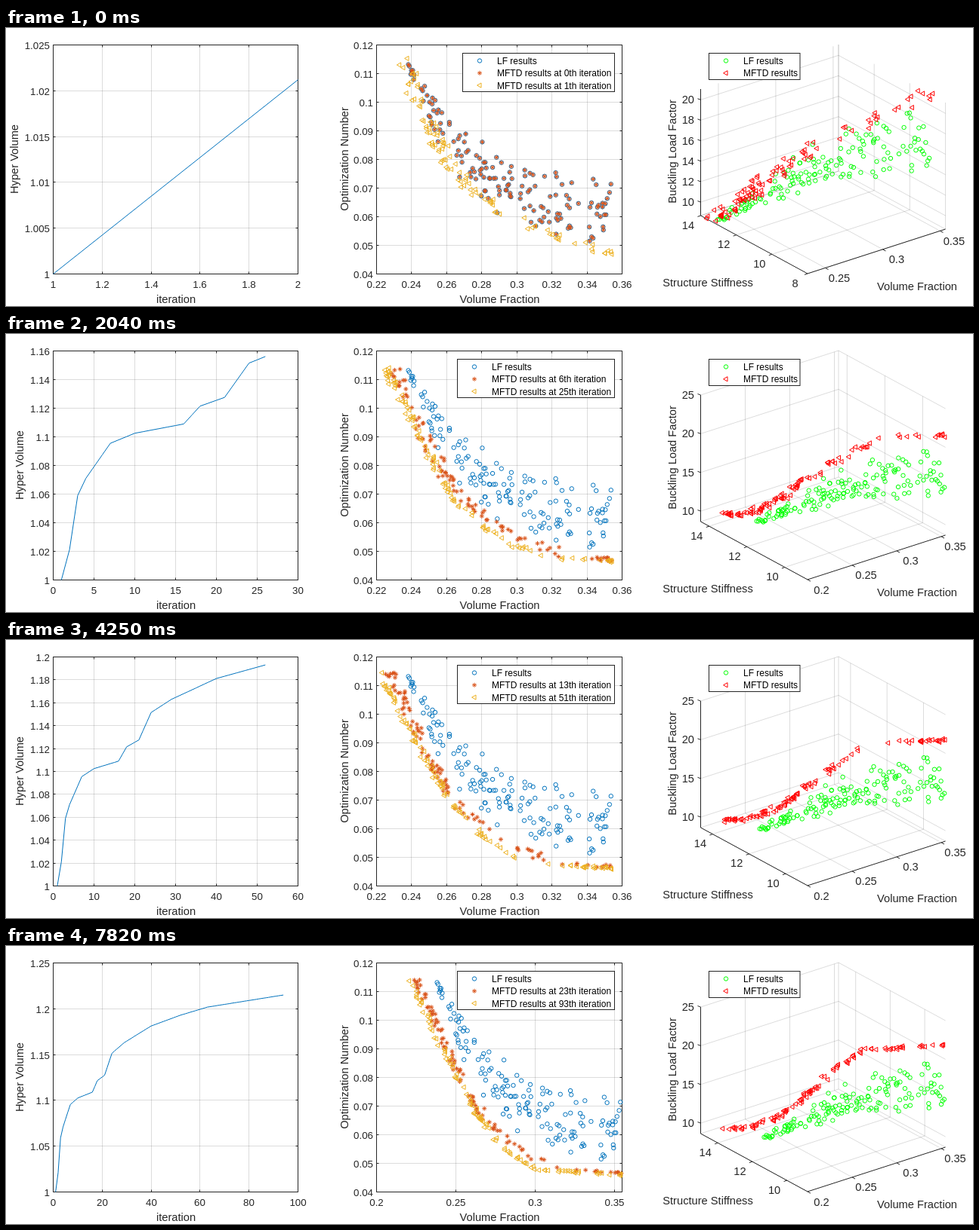
An HTML page for the animation above (7990 ms loop, 1280x369 px).

```html
<!DOCTYPE html>
<html lang="en">
<head>
<meta charset="utf-8">
<title>Optimization progress</title>
<style>
html, body { margin: 0; width: 100%; height: 100%; overflow: hidden; background: #fff; }
svg { display: block; width: 1280px; height: 369px; font-family: "Liberation Sans", Arial, sans-serif; fill: none; }
text { fill: #262626; font-size: 13.3px; }
.name, .space text { font-size: 14.67px; }
.key text { font-size: 12px; fill: #000; }
.key rect { fill: #fff; stroke: #262626; }
.grid { stroke: #262626; stroke-opacity: .16; }
.axis { stroke: #262626; }
</style>
</head>
<body>
<svg id="stage" viewBox="0 0 1280 369"></svg>
<script>
const STEP = 170, STEPS = 47;
const BLUE = '#0072bd', RUST = '#d95319', GOLD = '#edb120', GREEN = '#00ff00', RED = '#ff0000';
const stage = document.getElementById('stage');

// Turning points of the hyper volume: [iteration, value]
const VOLUME = [[1, 1], [2, 1.0212], [3, 1.059], [4, 1.071], [7, 1.0955], [10, 1.1025], [16, 1.109], [18, 1.1215],
  [21, 1.1275], [24, 1.1515], [29, 1.163], [40, 1.1812], [52, 1.193], [63, 1.2018], [94, 1.215]];

const rnd = (a, b) => { const s = Math.sin(a * 12.9898 + b * 78.233 + 3.7) * 43758.5453; return s - Math.floor(s); };
const mix = (a, b, f) => a + (b - a) * f;
const fmt = v => String(+v.toFixed(4));
const r1 = v => Math.round(v * 10) / 10;

function volumeAt(n) {
  const i = Math.max(1, VOLUME.findIndex(p => p[0] >= n));
  const [a, va] = VOLUME[i - 1], [b, vb] = VOLUME[i];
  return mix(va, vb, (n - a) / (b - a));
}

// Progress of the search from 0 (start) to 1 (iteration 93)
const progress = it => Math.log(1 + it) / Math.log(94);

// Stage position in the middle chart to a design with its three properties
function design(x, y, noise) {
  const vol = .22 + (x - 490.5) / 2321, opt = .12 - (y - 22.5) / 3800;
  const stiff = 8.88 + 34.9 * (.3535 - vol) + 1.45 * Math.exp((.219 - vol) / .0155) + noise;
  return { vol, opt, stiff, load: 1 / opt };
}

// Low fidelity designs fill a band above an exponential decay
const base = Array.from({ length: 150 }, (_, i) => {
  const x = 532 + 272 * rnd(i, 7), d = x - 530;
  const floor = 298 - 254 * Math.exp(-d / 75), span = 90 * (1 - Math.exp(-d / 45));
  return design(x, floor - span * rnd(i, 8), (rnd(i, 9) - .5) * .5);
});

// Each member keeps its place for a while, then is renewed on the front of that time
function front(it) {
  return Array.from({ length: 100 }, (_, j) => {
    const off = rnd(j, 1), era = Math.floor(Math.log(1 + it) * 5 + off);
    const born = Math.max(0, Math.exp((era - off) / 5) - 1);
    const seed = j + era * 131, p = progress(born);
    const slope = h => mix(531, 489, p) + mix(90, 140, p) * h + mix(180, 45, p) * h ** mix(4, 8, p);
    const amp = 4 + 7 * Math.exp(-born / 15);
    const dx = (rnd(seed, 3) * 2 - 1) * amp, dy = (rnd(seed, 4) - .5) * amp;
    const noise = (rnd(seed, 6) - .5) * amp * .05;
    const tail = .06 + (803 - slope(1)) / 900, t = rnd(seed, 2);
    if (t > tail) {
      const h = (t - tail) / (1 - tail);
      return design(slope(h) + dx, 44 + 252 * h + dy, noise);
    }
    const f = 1 - (1 - t / tail) ** 1.7;
    return design(mix(slope(1), 802, f), 297 + 7 * p * f + dy * .6, noise);
  });
}

const path = (d, attr) => `<path d="${d}" ${attr}/>`;
const text = (x, y, s, anchor = 'middle', more = '') => `<text x="${r1(x)}" y="${r1(y)}" text-anchor="${anchor}" ${more}>${s}</text>`;
const name = (x, y, s) => text(x, y, s, 'middle', 'class="name"');
const upright = (x, y, s) => text(0, 0, s, 'middle', `class="name" transform="translate(${x} ${y}) rotate(-90)"`);
const line = (a, b) => `M${r1(a[0])} ${r1(a[1])}L${r1(b[0])} ${r1(b[1])}`;

const SHAPES = {
  ring: 'm-2.7 0a2.7 2.7 0 1 0 5.4 0a2.7 2.7 0 1 0 -5.4 0',
  star: 'm-3 0h6m-3 -3v6m-2.1 -5.1l4.2 4.2m0 -4.2l-4.2 4.2',
  tri: 'm-3.4 0l5.4 -3.1v6.2z'
};
const marks = (pts, shape, color) =>
  path(pts.map(p => `M${r1(p[0])} ${r1(p[1])}${SHAPES[shape]}`).join(''), `stroke="${color}"`);

function niceScale(lo, hi, most) {
  for (let e = -3; ; e++) for (const m of [1, 2, 5]) {
    const step = m * 10 ** e;
    const a = Math.floor(lo / step + 1e-6) * step, b = Math.ceil(hi / step - 1e-6) * step;
    if ((b - a) / step < most + .5) return { lo: a, hi: b, step };
  }
}

function ticks({ lo, hi, step }) {
  const out = [];
  for (let i = Math.ceil(lo / step - 1e-6); i * step <= hi + 1e-6; i++) out.push(i * step);
  return out;
}

function flatAxes(x0, x1, sx, sy) {
  const y0 = 326.5, y1 = 22.5;
  const X = v => x0 + (v - sx.lo) / (sx.hi - sx.lo) * (x1 - x0);
  const Y = v => y0 - (v - sy.lo) / (sy.hi - sy.lo) * (y0 - y1);
  let grid = '', axis = `M${x0} ${y0}H${x1}V${y1}H${x0}Z`, labels = '';
  for (const v of ticks(sx)) {
    const x = Math.floor(X(v)) + .5;
    grid += `M${x} ${y0}V${y1}`;
    axis += `M${x} ${y0}v-3M${x} ${y1}v3`;
    labels += text(x, 345, fmt(v));
  }
  for (const v of ticks(sy)) {
    const y = Math.floor(Y(v)) + .5;
    grid += `M${x0} ${y}H${x1}`;
    axis += `M${x0} ${y}h3M${x1} ${y}h-3`;
    labels += text(x0 - 4.5, y + 5, fmt(v), 'end');
  }
  return { X, Y, svg: path(grid, 'class="grid"') + path(axis, 'class="axis"') + labels };
}

function legend(x, w, h, rows) {
  return `<g class="key"><rect x="${x}" y="33.5" width="${w}" height="${h}"/>` + rows.map(([s, shape, color], i) => {
    const y = 43.5 + i * 16.3;
    return marks([[x + 22.5, y]], shape, color) + text(x + 45.5, y + 4.5, s, 'start');
  }).join('') + '</g>';
}

function volumeChart(n) {
  const sy = niceScale(1, volumeAt(n), 10);
  const ax = flatAxes(62.5, 386.5, niceScale(1, n, 8), sy);
  let d = '';
  for (let m = 1; m <= n; m++) d += (m > 1 ? 'L' : 'M') + r1(ax.X(m)) + ' ' + r1(ax.Y(volumeAt(m)));
  return ax.svg + path(d, `stroke="${BLUE}"`) +
    name(225, 365, 'iteration') + upright(sy.step < .006 ? 16 : 23, 174, 'Hyper Volume');
}

function frontChart(k, it, now) {
  const past = Math.round(it / 4);
  const sx = k < 43 ? { lo: .22, hi: .36, step: .02 } : { lo: .2, hi: .3547, step: .05 };
  const ax = flatAxes(490.5, 815.5, sx, { lo: .04, hi: .12, step: .01 });
  const place = list => list.map(p => [ax.X(p.vol), ax.Y(p.opt)]);
  const left = it < 10 ? 604.5 : 597.5;
  return ax.svg + marks(place(base), 'ring', BLUE) +
    marks(place(past ? front(past) : base), 'star', RUST) + marks(place(now), 'tri', GOLD) +
    name(653.5, 365, 'Volume Fraction') + upright(453, 174, 'Optimization Number') +
    legend(left, 805.5 - left, 51, [['LF results', 'ring', BLUE],
      [`MFTD results at ${past}th iteration`, 'star', RUST], [`MFTD results at ${it}th iteration`, 'tri', GOLD]]);
}

function spaceChart(k, it, now) {
  const sv = { lo: k ? .2 : .2345, hi: .3547, step: .05 };
  const ss = { lo: k ? 8.8 : 8, hi: k ? 14.25 + it * .008 : 14, step: 2 };
  const sz = k < 12 ? { lo: 8.68, hi: 21.05, step: 2 } : { lo: 8.65, hi: 25, step: 5 };
  const unit = (v, s) => (v - s.lo) / (s.hi - s.lo);
  const P = (u, s, w) => [1061 + 182.5 * u - 141.5 * s, 326 - 59 * u - 77 * s - 168 * w];
  const place = list => list.map(p => P(unit(p.vol, sv), unit(p.stiff, ss), unit(p.load, sz)));
  let grid = line(P(0, 1, 0), P(1, 1, 0)) + line(P(1, 1, 0), P(1, 0, 0)) + line(P(1, 1, 0), P(1, 1, 1));
  let axis = line(P(0, 1, 1), P(0, 1, 0)) + line(P(0, 1, 0), P(0, 0, 0)) + line(P(0, 0, 0), P(1, 0, 0));
  let labels = '';
  for (const v of ticks(sv)) {
    const u = unit(v, sv), [x, y] = P(u, 0, 0);
    grid += line(P(u, 0, 0), P(u, 1, 0)) + line(P(u, 1, 0), P(u, 1, 1));
    axis += line([x, y], [x + 4, y + 2.2]);
    labels += text(x + 18.5, y + 18.5, fmt(v));
  }
  for (const v of ticks(ss)) {
    const s = unit(v, ss), [x, y] = P(0, s, 0);
    grid += line(P(0, s, 0), P(1, s, 0)) + line(P(1, s, 0), P(1, s, 1));
    axis += line([x, y], [x - 4, y + 1.4]);
    labels += text(x - 16.5, y + 17.5, fmt(v));
  }
  for (const v of ticks(sz)) {
    const w = unit(v, sz), [x, y] = P(0, 1, w);
    grid += line(P(0, 1, w), P(1, 1, w)) + line(P(1, 1, w), P(1, 0, w));
    axis += line([x, y], [x - 4, y - 1.5]);
    labels += text(911, y + 5, fmt(v), 'end');
  }
  return path(grid, 'class="grid"') + path(axis, 'class="axis"') + `<g class="space">${labels}</g>` +
    marks(place(base), 'ring', GREEN) + marks(place(now), 'tri', RED) +
    name(929, 343, 'Structure Stiffness') + name(1206, 348, 'Volume Fraction') + upright(887, 164, 'Buckling Load Factor') +
    legend(930.5, 120.5, 35, [['LF results', 'ring', GREEN], ['MFTD results', 'tri', RED]]);
}

let shown = -1;
function draw(ms) {
  const k = Math.floor(ms / STEP) % STEPS;
  if (k === shown) return;
  shown = k;
  const it = 2 * k + 1, now = front(it);
  stage.innerHTML = volumeChart(it + 1) + frontChart(k, it, now) + spaceChart(k, it, now);
}

const start = performance.now();
function loop() {
  draw(performance.now() - start);
  requestAnimationFrame(loop);
}
loop();
</script>
</body>
</html>
```
